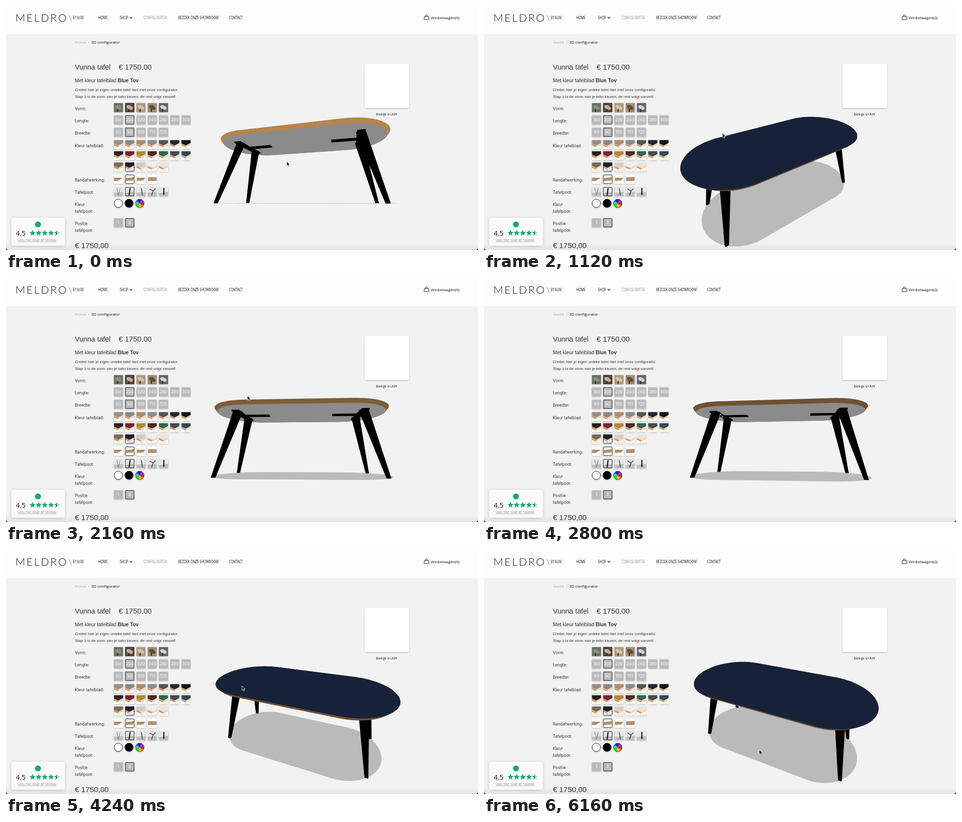
Recreate the animation shown at these times as an HTML page. Size 960x499 px, loop 6.24 s.

```html
<!DOCTYPE html>
<html lang="nl">
<head>
<meta charset="utf-8">
<title>3D configurator</title>
<style>
html, body { margin: 0; width: 100%; height: 100%; overflow: hidden; background: #f2f2f2; }
svg { display: block; width: 960px; height: 499px; }
text { font-family: "Liberation Sans", Arial, sans-serif; fill: #333; }
.open { font-family: "Open Sans", sans-serif; }
.label, .num { font-family: Inter, sans-serif; font-size: 8.3px; }
.num { fill: #fff; text-anchor: middle; }
.nav { font-family: "Open Sans", sans-serif; font-size: 9.5px; fill: #111; }
.tiny { font-size: 2.4px; fill: #888; }
</style>
</head>
<body>
<svg id="stage" viewBox="0 0 960 499" xmlns="http://www.w3.org/2000/svg">
  <defs>
    <filter id="soft" x="-20%" y="-20%" width="140%" height="150%">
      <feDropShadow dx="0" dy="1" stdDeviation="1" flood-opacity=".3"/>
    </filter>
    <filter id="lift" x="-20%" y="-20%" width="140%" height="150%">
      <feDropShadow dx="0" dy="1" stdDeviation="3" flood-opacity=".18"/>
    </filter>
    <linearGradient id="foot" x2="0" y2="1">
      <stop stop-color="#e4e4e4" stop-opacity="0"/><stop offset="1" stop-color="#e4e4e4"/>
    </linearGradient>
  </defs>
  <rect width="960" height="499" fill="#f2f2f2"/>
  <rect width="960" height="57.5" fill="#fdfdfd"/>
  <rect y="485" width="960" height="14" fill="url(#foot)"/>

  <text x="19" y="31.5" style="font:300 22px Lato,sans-serif;letter-spacing:2.6px;fill:#111">MELDRO</text>
  <path d="M128 18L133 31" stroke="#555" stroke-width=".7"/>
  <g id="nav"></g>
  <path d="M251.500 22.500l2.600 2.600l2.600-2.600" fill="none" stroke="#111" stroke-width="1.200"/>
  <path d="M851 21.500h8.500l.8 6.500h-10.100zM853 21.500v-1a2.200 2.400 0 0 1 4.500 0v1" fill="none" stroke="#222" stroke-width="1"/>
  <text class="open" x="864" y="26.500" font-size="8" style="fill:#111">Winkelwagen(0)</text>
  <text class="open" x="140" y="76.500" font-size="8" style="fill:#aaa">Home&#160; /</text>
  <text class="open" x="173.500" y="76.500" font-size="8" style="fill:#111">3D configurator</text>

  <text x="140" y="130" font-size="14.500">Vunna tafel</text>
  <text x="229" y="130" font-size="15.200">€ 1750,00</text>
  <text x="140" y="155.500" font-size="10.300">Met kleur tafelblad <tspan font-weight="700">Blue Tov</tspan></text>
  <text x="140" y="174" font-size="8">Creëer hier je eigen unieke tafel hier met onze configurator.</text>
  <text x="140" y="188" font-size="8">Stap 1 is de vorm van je tafel kiezen, de rest volgt vanzelf.</text>
  <g id="labels"></g>
  <g id="options"></g>
  <text x="140" y="495" font-size="15.500">€ 1750,00</text>

  <rect x="729" y="118" width="91" height="91" rx="4" fill="#fff" filter="url(#soft)"/>
  <text x="752.500" y="224" font-size="8">Bekijk in AR</text>

  <path id="shadow" fill="#bababa"/>
  <path id="legsUnder" fill="#000"/>
  <path id="edge"/>
  <path id="face"/>
  <path id="legsOver" fill="#000"/>

  <g id="review">
    <rect x="11" y="433" width="108.500" height="57" rx="4" fill="#fafafa" filter="url(#lift)"/>
    <circle cx="65" cy="446.800" r="6" fill="#13aa72"/>
    <text class="open" x="20" y="469.500" font-size="14" style="fill:#111">4.5</text>
    <text class="open" x="24" y="481" font-size="6.600" text-decoration="underline" style="fill:#888">Lees hier onze 40 reviews</text>
  </g>
  <path d="M0 493v6h6q-6 0-6-6M960 493v6h-6q6 0 6-6" fill="#222"/>
  <path id="cursor" d="M0 0v9l2.100-1.900l1.400 3.200l1.700-.8l-1.400-3.100h2.800z" fill="#000" stroke="#fff" stroke-width=".8"/>
</svg>
<script>
const $ = id => document.getElementById(id);
const NS = "http://www.w3.org/2000/svg";

function add(parent, tag, attrs, text) {
  const el = document.createElementNS(NS, tag);
  for (const k in attrs) el.setAttribute(k, attrs[k]);
  if (text !== undefined) el.textContent = text;
  parent.appendChild(el);
  return el;
}

/* ---- static page ---- */
function nav(x, label, fill, size) {
  add($("nav"), "text", {
    class: "nav", transform: `translate(${x} 27.300) scale(.67 1)`,
    style: `fill:${fill || "#111"};font-size:${size || 9.5}px`
  }, label);
}
nav(135.5, "BY NUM.", "#222", 8.6);
nav(187.5, "HOME");
nav(231.5, "SHOP");
nav(279.5, "CONFIGURATOR", "#a98a70");
nav(350, "BEZOEK ONZE SHOWROOM");
nav(453.5, "CONTACT");

[["Vorm:", 213], ["Lengte:", 238], ["Breedte:", 263], ["Kleur tafelblad:", 288.5],
 ["Randafwerking:", 359], ["Tafelpoot:", 384], ["Kleur", 409], ["tafelpoot:", 423],
 ["Positie", 448], ["tafelpoot:", 462]]
  .forEach(([s, y]) => add($("labels"), "text", { class: "label", x: 140, y }, s));

const opts = $("options");

function tile(i, y, fill, chosen, draw) {
  const g = add(opts, "g", { transform: `translate(${219.5 + i * 22.9} ${y})` });
  add(g, "rect", { width: 18.5, height: 18.5, rx: 1, fill, filter: "url(#soft)" });
  draw(g);
  if (chosen) add(g, "rect", { x: .5, y: .5, width: 17.5, height: 17.5, rx: 1, fill: "none", stroke: "#222", "stroke-width": 1 });
}
const poly = (g, points, fill) => add(g, "polygon", { points, fill });

["#6b7268 #8b8f80", "#5a4c44 #c9ad94", "#b29a78 #d8c4a6", "#a08a68 #5c5040", "#5c656c #d0d4d4"].forEach((pair, i) => {
  const [back, top] = pair.split(" ");
  tile(i, 198.5, back, i === 1, g => {
    add(g, "ellipse", { cx: 9, cy: 9, rx: 7, ry: 4, fill: top, transform: "rotate(25 9 9)" });
    poly(g, "7,12 9,12 8,18 6,18", "#2a2624");
  });
});

const numbers = (list, y) => list.forEach((n, i) =>
  tile(i, y, "#b9b9b9", i === 1, g => add(g, "text", { class: "num", x: 9.25, y: 12.3 }, n)));
numbers([180, 200, 220, 240, 260, 280, 300], 223.5);
numbers([80, 90, 100, 110, 120], 248.8);
numbers([1, 2], 434);

const tints = ("a08c7c 8d8688 a98c6c 8a8a8c 5a5048 1d2638 111111 2b2018 7a2430 b08a2c 4a2a26 " +
  "2a6a45 3f5046 2e4a5e 80684e 14203a d8cdbd eeeeee e8e4de").split(" ");
tints.forEach((c, n) => tile(n % 7, 274.3 + 22.8 * Math.floor(n / 7), "#fff", n === 15, g => {
  poly(g, "0,0 18.5,0 18.5,6 9,11 0,7", "#" + c);
  poly(g, "0,7 9,11 9,15 0,11", "#c99f74");
  poly(g, "9,11 18.5,6 18.5,10 9,15", "#ecd3bf");
  add(g, "text", { class: "tiny", x: 6, y: 17.5 }, "Hout kleur");
}));

["0,6 17,6 8,13 0,13", "1,7 18,5 16,12 1,13", "1,6 18,6 14,12 1,13", "1,5 18,5 18,13 1,13"].forEach((p, i) =>
  tile(i, 345, "#fff", i === 1, g => {
    poly(g, p, "#b99668");
    add(g, "path", { d: "M1 9L17 8", stroke: "#8d6d45", "stroke-width": .6 });
  }));

["M6 2L9 17M13 2L9 17", "M10 2L8 17", "M10 2L12 17", "M4 4L11 8L16 3M11 8L8 17", "M10 2V16"].forEach((d, i) =>
  tile(i, 370.3, "#e6e6e6", i === 1, g => {
    poly(g, "0,12 18.5,10 18.5,18.5 0,18.5", "#bdbdbd");
    add(g, "path", { d, fill: "none", stroke: i ? "#181818" : "#888", "stroke-width": i === 1 || i === 4 ? 2.4 : 1.2 });
  }));

const dot = (cx, fill) => add(opts, "circle", { cx, cy: 403.5, r: 8.4, fill, stroke: "#111", "stroke-width": .9, filter: "url(#soft)" });
dot(228.5, "#fff");
dot(250.3, "#000");
dot(272, "#777");
for (let i = 0; i < 12; i++) {
  const at = a => `${272 + 8 * Math.cos(a)} ${403.5 + 8 * Math.sin(a)}`;
  const a = i * Math.PI / 6;
  add(opts, "path", { d: `M272 403.500L${at(a)}A8 8 0 0 1 ${at(a + .54)}z`, fill: `hsl(${i * 30} 85% 48%)` });
}

function star(cx, cy, r, fill, half) {
  const pts = [];
  for (let i = 0; i <= (half ? 5 : 9); i++) {
    const a = -Math.PI / 2 - i * Math.PI / 5, q = i % 2 ? r * .42 : r;
    pts.push(`${cx + q * Math.cos(a)},${cy + q * Math.sin(a)}`);
  }
  poly($("review"), pts.join(" "), fill);
}
for (let i = 0; i < 5; i++) star(54 + i * 12.5, 464.3, 6.6, i < 4 ? "#13aa72" : "#c9c9c9");
star(104, 464.3, 6.6, "#13aa72", true);

/* ---- table model (centimetres, origin at the orbit centre) ---- */
const DIST = 217, FOCAL = 370, CY = 325;
const TOP = 31, UNDER = 27.2, FLOOR = -45;

function stadium(len, r, y) {
  const pts = [];
  for (let i = 0; i < 96; i++) {
    const a = (i + .5) / 96 * 2 * Math.PI, c = Math.cos(a);
    pts.push([Math.sign(c) * (len - r) + r * c, y, r * Math.sin(a)]);
  }
  return pts;
}
const rect = (x, y, z, hx, hz) =>
  [[-1, -1], [1, -1], [1, 1], [-1, 1]].map(([a, b]) => [x + a * hx, y, z + b * hz]);
const slab = (x, z, hx, hz) => [...rect(x, UNDER, z, hx, hz), ...rect(x, UNDER - 1.5, z, hx, hz)];

const topRim = stadium(100.7, 47.7, TOP);
const underRim = stadium(97.7, 44.7, UNDER);
const ground = stadium(100.7, 47, FLOOR);
const legs = [], bars = [];
for (const sx of [-1, 1]) {
  for (const sz of [-1, 1])
    legs.push([...rect(70 * sx, UNDER, 18 * sz, 4.8, 2), ...rect(86.5 * sx, FLOOR, 33 * sz, 1.8, 1.2)]);
  bars.push(slab(70 * sx, 0, 4, 26), slab(54 * sx, 0, 16, 3));
}

function camera(yaw, pitch) {
  const rad = Math.PI / 180, cs = Math.cos(yaw * rad), sn = Math.sin(yaw * rad);
  const cp = Math.cos(pitch * rad), sp = Math.sin(pitch * rad), cx = 599.5 + 6 * sn;
  return ([x, y, z]) => {
    const rx = x * cs + z * sn, rz = z * cs - x * sn;
    const k = FOCAL / (DIST - rz * cp - y * sp);
    return [cx + rx * k, CY - (y * cp - rz * sp) * k];
  };
}

function hull(pts) {
  const p = pts.slice().sort((a, b) => a[0] - b[0] || a[1] - b[1]);
  const half = list => {
    const h = [];
    for (const q of list) {
      while (h.length > 1) {
        const a = h[h.length - 2], b = h[h.length - 1];
        if ((b[0] - a[0]) * (q[1] - a[1]) - (b[1] - a[1]) * (q[0] - a[0]) > 0) break;
        h.pop();
      }
      h.push(q);
    }
    h.pop();
    return h;
  };
  return half(p).concat(half(p.reverse()));
}
const path = pts => "M" + pts.map(q => q[0].toFixed(2) + " " + q[1].toFixed(2)).join("L") + "z";

/* ---- motion: time, yaw, pitch, cursor x, cursor y, damping into this key ---- */
const keys = [
  [0, -15, -11.7, 571, 322, 0],
  [1120, 34, 35, 485, 264, 4.5],
  [1520, 34, 35, 485, 264, 0],
  [1840, 1.5, 7.9, 498, 221, .8],
  [2400, -4, -11.5, 489, 252, 1.8],
  [2640, -4, -11.9, 480, 282, 0],
  [2720, -4, -11.9, 480, 282, 0],
  [2800, -5.5, -5.7, 480, 282, 0],
  [5360, -24, 36.5, 480, 282, 3.1],
  [5520, -24, 36.5, 480, 282, 0],
  [6080, -24, 36.5, 560, 413, 1],
  [6240, -24, 36.5, 560, 413, 0]
];

function pose(t) {
  let i = 1;
  while (t > keys[i][0]) i++;
  const a = keys[i - 1], b = keys[i], d = b[5];
  let u = (t - a[0]) / (b[0] - a[0]);
  if (d) u = (1 - Math.exp(-d * u)) / (1 - Math.exp(-d));
  return [1, 2, 3, 4].map(n => a[n] + (b[n] - a[n]) * u);
}

function render(t) {
  const [yaw, pitch, mx, my] = pose(t);
  const cam = camera(yaw, pitch);
  const eye = DIST * Math.sin(pitch * Math.PI / 180);
  const below = eye < UNDER;
  const solids = list => list.map(s => path(hull(s.map(cam)))).join("");
  const rim = topRim.map(cam), base = underRim.map(cam);

  $("shadow").setAttribute("d", path(ground.map(cam)));
  $("legsUnder").setAttribute("d", below ? "" : solids(legs));
  $("legsOver").setAttribute("d", below ? solids(legs) + solids(bars) : "");
  $("edge").setAttribute("d", path(hull(rim.concat(base))));
  const lit = Math.max(0, Math.min(1, (-5.7 - pitch) / 6));
  const mix = (p, q) => Math.round(p + (q - p) * lit);
  $("edge").setAttribute("fill", `rgb(${mix(112, 181)},${mix(81, 133)},${mix(50, 74)})`);
  $("face").setAttribute("d", below ? path(base) : eye > TOP ? path(rim) : "");
  $("face").setAttribute("fill", below ? "#8b8b8b" : "#172239");
  $("cursor").setAttribute("transform", `translate(${mx.toFixed(1)} ${(my - 4).toFixed(1)})`);
}

const LOOP = 6240, STEP = 80;
const start = performance.now();
function tick() {
  const t = (performance.now() - start) % LOOP;
  render(Math.floor(t / STEP) * STEP);
  requestAnimationFrame(tick);
}
tick();
</script>
</body>
</html>
```
